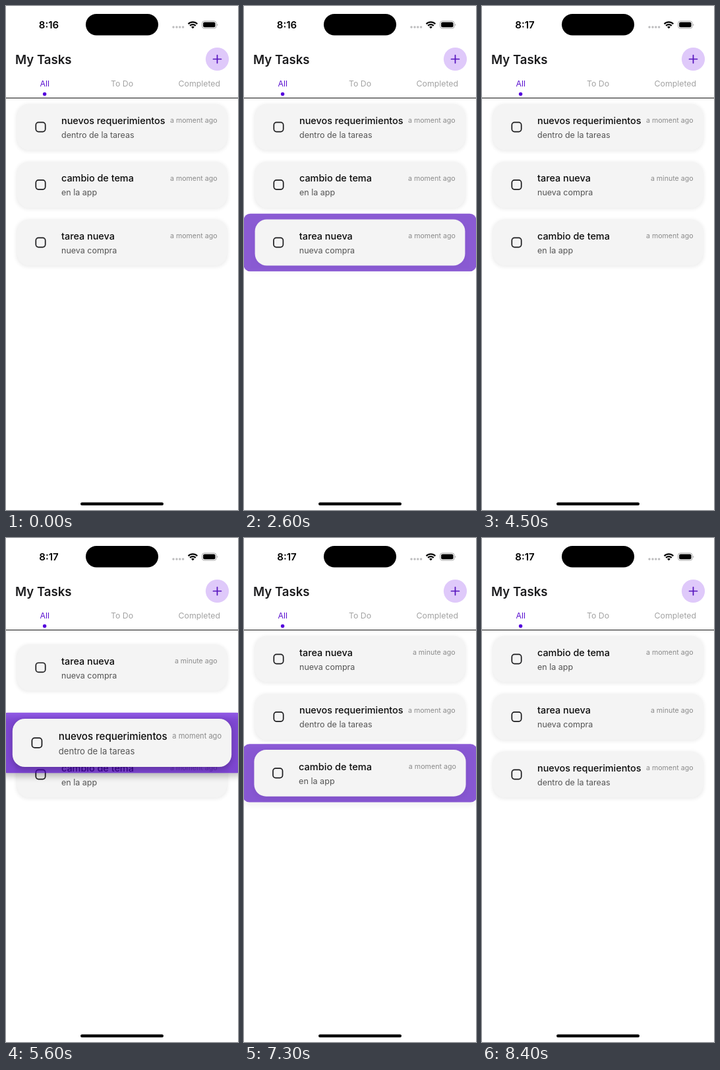
An HTML page for the animation above (8500 ms loop, 352 px wide and 764 px high).

```html
<!DOCTYPE html>
<html lang="en">
<head>
<meta charset="utf-8">
<title>My Tasks</title>
<style>
  html, body { margin: 0; width: 100%; height: 100%; overflow: hidden; background: #fff; }
  svg { display: block; width: 100vw; height: 100vh; font-family: Inter, "Open Sans", sans-serif; }
  .clock { font-size: 15px; font-weight: 600; text-anchor: middle; }
  .heading { font-size: 18.6px; font-weight: 600; fill: #1c1c1e; }
  .tab { font-size: 12.3px; fill: #a3a3a3; text-anchor: middle; }
  .tab.on { fill: #5a10d0; }
  .title { font-size: 14.4px; font-weight: 500; fill: #0c0c0c; }
  .note { font-size: 12.5px; fill: #555; }
  .age { font-size: 10.6px; fill: #8b8b8b; text-anchor: end; }
</style>
</head>
<body>
<svg id="stage" viewBox="0 0 352 764">
  <defs>
    <filter id="soft" x="-10%" y="-40%" width="120%" height="180%"><feGaussianBlur stdDeviation="3.2"/></filter>
    <filter id="deep" x="-10%" y="-40%" width="120%" height="180%"><feGaussianBlur stdDeviation="4.5"/></filter>
  </defs>
  <rect width="352" height="764" fill="#fff"/>

  <text id="clock" class="clock" x="65" y="34">8:16</text>
  <rect x="121" y="12" width="110" height="32.5" rx="16.25"/>
  <g fill="#bcbcbe">
    <circle cx="254" cy="32" r="1.7"/><circle cx="259" cy="32" r="1.7"/>
    <circle cx="263.8" cy="32" r="1.7"/><circle cx="268.6" cy="32" r="1.7"/>
  </g>
  <g fill="none" stroke="#000" stroke-width="2.3">
    <path d="M276.6 27.2a9.6 9.6 0 0 1 13.6 0"/>
    <path d="M279.1 29.9a6.1 6.1 0 0 1 8.6 0"/>
  </g>
  <path d="M283.4 34.3l-2.4-2.5a3.5 3.5 0 0 1 4.8 0z"/>
  <rect x="297.5" y="22.9" width="21.6" height="11" rx="3.4" fill="none" stroke="#a6a6a6"/>
  <rect x="299.1" y="24.5" width="18.4" height="7.8" rx="2"/>
  <path d="M320.3 26.7a2 2 0 0 1 0 3.5z" fill="#a6a6a6"/>

  <text class="heading" x="14" y="87.8">My Tasks</text>
  <circle cx="320.5" cy="80.5" r="17.6" fill="#dfc9fa"/>
  <path d="M314.5 80.5h12M320.5 74.5v12" stroke="#5512bd" stroke-width="1.7" stroke-linecap="round"/>
  <text class="tab on" x="58.7" y="122.4">All</text>
  <text class="tab" x="176" y="122.4">To Do</text>
  <text class="tab" x="293.3" y="122.4">Completed</text>
  <circle cx="58.6" cy="133.5" r="2.7" fill="#5500dd"/>
  <path d="M0 139.5h352" stroke="#111"/>

  <g id="list"></g>
  <rect x="113" y="752.5" width="126" height="4.5" rx="2.25"/>
</svg>
<script>
const LOOP = 8500, TOP = 183.5, PITCH = 87.5, GROWTH = 0.047;
const list = document.getElementById('list');
const clock = document.getElementById('clock');

const tasks = [
  ['nuevos requerimientos', 'dentro de la tareas'],
  ['cambio de tema', 'en la app'],
  ['tarea nueva', 'nueva compra']
];

// Each drag: lift, follow the finger to `reach`, settle into row `to`, drop.
// `swaps` lists [card, time, rows moved] for the cards that make room.
const drags = [
  { card: 2, lift: 2590, go: 2700, stop: 3400, from: 2, to: 1, reach: 251.5,
    release: 3410, drop: 3650, swaps: [[1, 2950, 1]] },
  { card: 0, lift: 4985, go: 5150, stop: 5650, from: 0, to: 1, reach: 314,
    release: 5800, drop: 5980, swaps: [[2, 5412, -1]] },
  { card: 1, lift: 7255, go: 7270, stop: 7750, from: 2, to: 0, reach: TOP,
    release: 7900, drop: 8080, swaps: [[0, 7400, 1], [2, 7500, 1]] }
];

const clamp = v => Math.min(1, Math.max(0, v));
const smooth = p => p * p * (3 - 2 * p);
const easeOut = p => 1 - (1 - p) ** 3;
const progress = (t, a, b) => clamp((t - a) / (b - a));
const mix = (a, b, p) => a + (b - a) * p;
const rowY = row => TOP + PITCH * row;

const cards = tasks.map(([title, note]) => {
  const g = document.createElementNS('http://www.w3.org/2000/svg', 'g');
  g.innerHTML = `
    <g class="active">
      <rect class="cast" y="-38.5" width="352" height="87.5" rx="10" filter="url(#deep)"/>
      <rect class="band" y="-43.75" width="352" height="87.5" rx="10" fill-opacity=".64"/>
      <rect class="cast" x="17" y="-32" width="318" height="70" rx="18" filter="url(#deep)"/>
    </g>
    <rect class="halo" x="16" y="-34" width="320" height="70.5" rx="18" opacity=".085" filter="url(#soft)"/>
    <rect x="17" y="-35" width="318" height="70" rx="18" fill="#f4f4f4"/>
    <rect x="45.3" y="-7.1" width="14.4" height="14.2" rx="4" fill="none" stroke="#1c1c1e" stroke-width="1.7"/>
    <text class="title" x="84" y="-4.6">${title}</text>
    <text class="note" x="84" y="16.4">${note}</text>
    <text class="age" x="320.5" y="-6.3">a moment ago</text>`;
  list.append(g);
  const find = s => g.querySelector(s);
  return { g, active: find('.active'), band: find('.band'), halo: find('.halo'),
           casts: g.querySelectorAll('.cast'), age: find('.age') };
});

function liftAt(d, t) {
  const up = 1 - Math.exp(-(Math.min(t, d.drop) - d.lift) / 190);
  return up * (1 - easeOut(progress(t, d.drop, d.drop + 250)));
}

function poseAt(t) {
  const poses = tasks.map((_, row) => ({ y: rowY(row), lift: 0, held: false }));
  for (const d of drags) {
    if (t < d.lift) break;
    const pose = poses[d.card];
    const follow = mix(rowY(d.from), d.reach, smooth(progress(t, d.go, d.stop)));
    pose.y = mix(follow, rowY(d.to), easeOut(progress(t, d.release, d.drop)));
    pose.lift = liftAt(d, t);
    pose.held = t < d.drop;
    for (const [card, at, rows] of d.swaps)
      poses[card].y += PITCH * rows * easeOut(progress(t, at, at + 400));
  }
  return poses;
}

function render(t) {
  clock.textContent = t < 3000 ? '8:16' : '8:17';
  cards[2].age.textContent = t < 4500 ? 'a moment ago' : 'a minute ago';
  poseAt(t).forEach(({ y, lift, held }, i) => {
    const c = cards[i];
    const scale = 1 + GROWTH * lift;
    c.g.setAttribute('transform', `translate(176 ${y}) scale(${scale}) translate(-176 0)`);
    c.active.setAttribute('display', held ? 'inline' : 'none');
    c.halo.setAttribute('display', held ? 'none' : 'inline');
    c.band.setAttribute('fill', `rgb(${mix(73, 88, lift)},0,${mix(186, 218, lift)})`);
    c.casts.forEach(s => s.setAttribute('opacity', 0.24 * lift));
    if (lift > 0 && list.lastChild !== c.g) list.append(c.g);
  });
}

const start = performance.now();
function tick() {
  render((performance.now() - start) % LOOP);
  requestAnimationFrame(tick);
}
tick();
</script>
</body>
</html>
```
